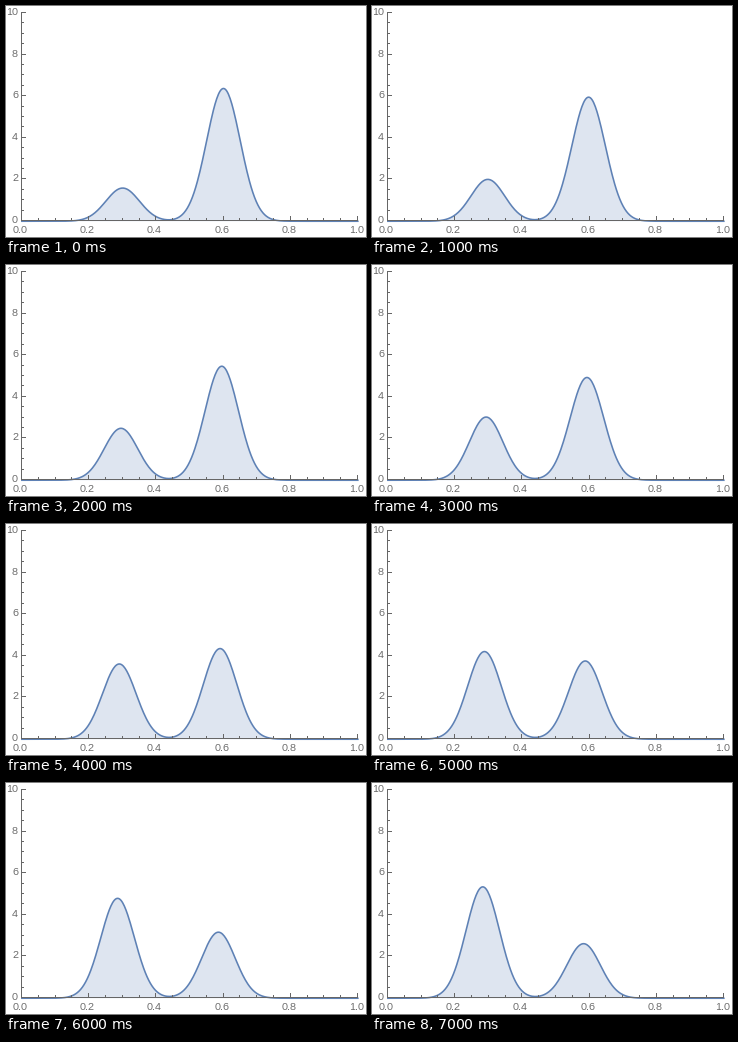
Recreate the animation shown at these times as a matplotlib script. Size 360 by 231 pixels, loop 8 s.

```python
import numpy as np
import matplotlib.pyplot as plt
from matplotlib.animation import FuncAnimation

# Hinted glyphs with whole-pixel advances
plt.rcParams["text.hinting"] = "native"
plt.rcParams["text.hinting_factor"] = 1

W, H, DPI = 360, 231, 72  # at 72 dpi one point is one pixel
X0, X1 = 15.5, 351.5      # pixel positions of x = 0 and x = 1
Y0, Y10 = 214.5, 6.5      # pixel positions of y = 0 and y = 10
DX, DY = 0.35, 0.75       # offset of the curve from the axes' pixel grid
DIGIT = 6                 # advance of one digit
BLUE = (0.368, 0.507, 0.710)
GRAY = "#666666"
SIGMA = 0.05
STEPS = 8


def px(x):
    return X0 + (X1 - X0) * x


def py(y):
    return Y0 + (Y10 - Y0) * y / 10


def normal(x, mean):
    z = (x - mean) / SIGMA
    return np.exp(-z * z / 2) / (SIGMA * np.sqrt(2 * np.pi))


def density(x, t):
    """Two-normal mixture, tilted by exp(-t x) and renormalised."""
    low, high = 0.2 * np.exp(-0.3 * t), 0.8 * np.exp(-0.6 * t)
    shift = t * SIGMA ** 2
    mix = low * normal(x, 0.3 - shift) + high * normal(x, 0.6 - shift)
    return mix / (low + high)


fig = plt.figure(figsize=(W / DPI, H / DPI), dpi=DPI, facecolor="white")
ax = fig.add_axes([0, 0, 1, 1])
ax.set_xlim(0, W)
ax.set_ylim(H, 0)
ax.axis("off")


def rule(xs, ys):
    ax.plot(xs, ys, color=GRAY, lw=1, snap=False, zorder=4,
            solid_capstyle="butt")


def label(x, y, text):
    ax.text(x, y, text, ha="left", va="baseline", fontsize=10, color=GRAY,
            family="Liberation Sans", zorder=5)


rule([X0 - 0.5, X1 + 0.5], [Y0, Y0])
rule([X0, X0], [Y0 - 0.5, Y10 - 0.5])
for i in range(21):
    major = i % 4 == 0
    size = 4 if major else 2
    x, y = (np.floor(v + 1e-6) + 0.5 for v in (px(i / 20), py(i / 2)))
    rule([x, x], [Y0 - 0.5, Y0 - 0.5 - size])
    rule([X0 + 0.5, X0 + 0.5 + size], [y, y])
    if major:
        label(x - 8.5, 227, f"{i / 20:.1f}")
        text = str(i // 2)
        label(12 - DIGIT * len(text), y + 2.5, text)

xs = np.linspace(0, 1, 401)
base = Y0 + DY
fill, = ax.fill(px(xs), py(0 * xs), color=BLUE, alpha=0.2, lw=0, zorder=2)
curve, = ax.plot([], [], color=BLUE, lw=1.6, zorder=3)


def update(step):
    points = np.column_stack([px(xs) + DX, py(density(xs, step)) + DY])
    curve.set_data(points[:, 0], points[:, 1])
    fill.set_xy(np.vstack([[X0 + DX, base], points, [X1 + DX, base]]))
    return fill, curve


anim = FuncAnimation(fig, update, frames=STEPS, interval=1000, repeat=True,
                     repeat_delay=0)
plt.show()
```
